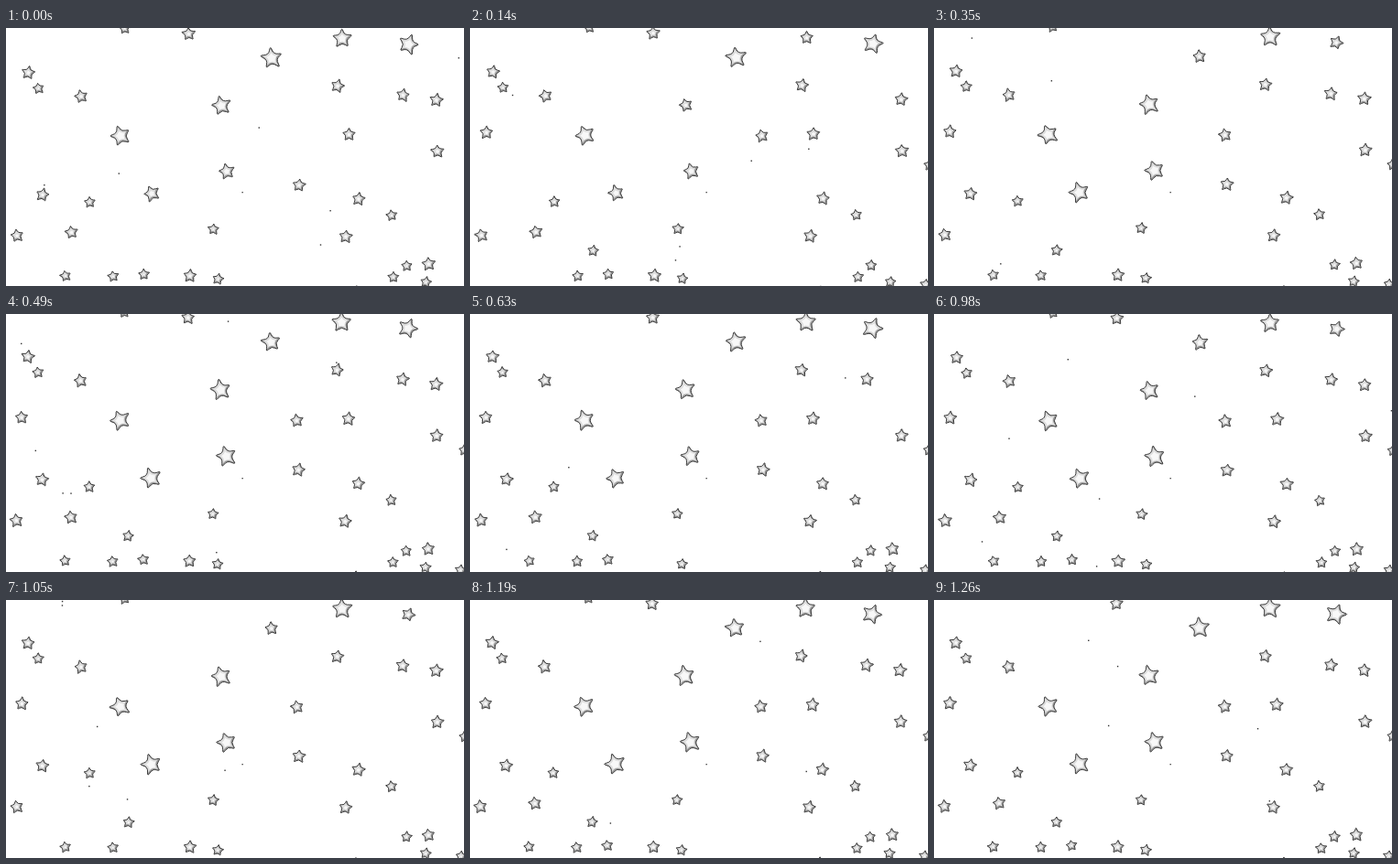
These frames come from a looping animation (500 px wide and 282 px high, 1.33 s). An HTML page with a canvas:

```html
<!DOCTYPE html>
<html lang="en">
<head>
<meta charset="utf-8">
<title>Twinkling stars</title>
<style>
  html, body { margin: 0; width: 500px; height: 282px; overflow: hidden; background: #fff; }
  canvas { display: block; }
</style>
</head>
<body>
<canvas id="sky" width="500" height="282"></canvas>
<script>
const ctx = document.getElementById('sky').getContext('2d');
const W = 500, H = 282;
const STEP = 70, STEPS = 19, CYCLE = 10;
const BIG = 11.7, MEDIUM = 7.6, SMALL = 6.4;

const hash = n => {
  const s = Math.sin(n * 127.1 + 11.7) * 43758.5453;
  return s - Math.floor(s);
};
const spread = (n, range) => (hash(n) * 2 - 1) * range;

// Each place is x, y, then optionally the phase of rest and a tilt in degrees.
const stars = [];
function scatter(r, places) {
  for (const [x, y, rest = null, tilt = spread(x + y, 11)] of places) {
    stars.push({ x, y, r, rest, tilt });
  }
}

scatter(BIG, [
  [290, 33, 5, -8], [367, 11.5, 2, 0], [439.5, 18, 5, 18], [235, 85, 2, -14],
  [125, 118, null, -18], [241, 157, 1, -14], [159, 181, 1, -20]
]);
scatter(MEDIUM, [
  [199.5, 6.5, 5], [24.5, 49], [82, 75, null, -14], [362, 63.5], [433.5, 73.5, 2],
  [470, 79, 9], [17.5, 115, 0], [318, 118.5, 0], [374.5, 116.5, 5], [471, 135],
  [320, 172, 2], [385, 187], [40, 182.5, 2], [12, 227], [71.5, 223.5, 5],
  [371, 228], [201, 271, 9], [461.5, 258, 2]
]);
scatter(SMALL, [
  [129.5, .5, 8.5], [35.5, 66], [501, 150.5, 0], [91.5, 190.5], [421, 205],
  [226.5, 220], [134, 244, 0], [65, 271, 2], [117, 271.5], [150.5, 269.5, 5],
  [231.5, 274.5], [437.5, 260], [423, 272.5, 5], [458.5, 278], [497, 281, 0],
  [382, 288]
]);

// At rest a big star shrinks and any other star is gone.
function radius({ r, rest }, phase) {
  if (rest === null) return r;
  const gap = Math.abs(phase - rest);
  const d = Math.min(gap, CYCLE - gap);
  if (r < BIG) return d < 1 ? 0 : r;
  return r * (1 - .35 * Math.exp(-((d / 1.5) ** 2)));
}

// Closed curve that rounds off every corner.
function softPath(points) {
  const mid = (a, b) => [(a[0] + b[0]) / 2, (a[1] + b[1]) / 2];
  const path = new Path2D();
  path.moveTo(...mid(points.at(-1), points[0]));
  points.forEach((p, i) => {
    path.quadraticCurveTo(...p, ...mid(p, points[(i + 1) % points.length]));
  });
  path.closePath();
  return path;
}

function drawStar(x, y, r, degrees, seed) {
  const tilt = degrees * Math.PI / 180;
  const points = Array.from({ length: 10 }, (_, i) => {
    const a = tilt + i * Math.PI / 5 - Math.PI / 2;
    const d = r * (i % 2 ? .4 : 1.17 + spread(seed + i, .1));
    return [x + Math.cos(a) * d, y + Math.sin(a) * d];
  });
  const path = softPath(points);
  const pen = (color, width) => {
    ctx.strokeStyle = color;
    ctx.lineWidth = width;
    ctx.stroke(path);
  };

  ctx.save();
  ctx.clip(path);
  ctx.fillStyle = '#f8f8f8';
  ctx.fill(path);
  pen('#dedede', 5);
  ctx.translate(-.7, -.7);
  pen('#999', 1.5);
  ctx.restore();
  pen('#383838', 1);
}

function draw(step) {
  const phase = step % CYCLE;
  const sway = .6 * Math.sin(phase / 9 * Math.PI * 2);
  const lift = 2.3 * Math.sin(phase / 9 * Math.PI / 2);

  ctx.fillStyle = '#fff';
  ctx.fillRect(0, 0, W, H);
  stars.forEach((s, n) => {
    const r = radius(s, phase);
    const seed = n * 31 + phase * 3;
    if (r) drawStar(s.x + sway, s.y - lift * (1.1 - s.y / 420), r, s.tilt + spread(seed, 4), seed);
  });

  // Stray pen marks: one stays, the others are new at every step.
  ctx.fillStyle = '#333';
  ctx.fillRect(257.5, 179, 1.3, 1.3);
  const strays = 2 + Math.floor(hash(step) * 6);
  for (let i = 0; i < strays; i++) {
    ctx.fillRect(hash(step * 9 + i) * W, hash(step * 13 + i + 50) * H, 1.4, 1.4);
  }
}

let shown = -1;
function tick() {
  const step = Math.floor(performance.now() / STEP) % STEPS;
  if (step !== shown) draw(shown = step);
  requestAnimationFrame(tick);
}
tick();
</script>
</body>
</html>
```
